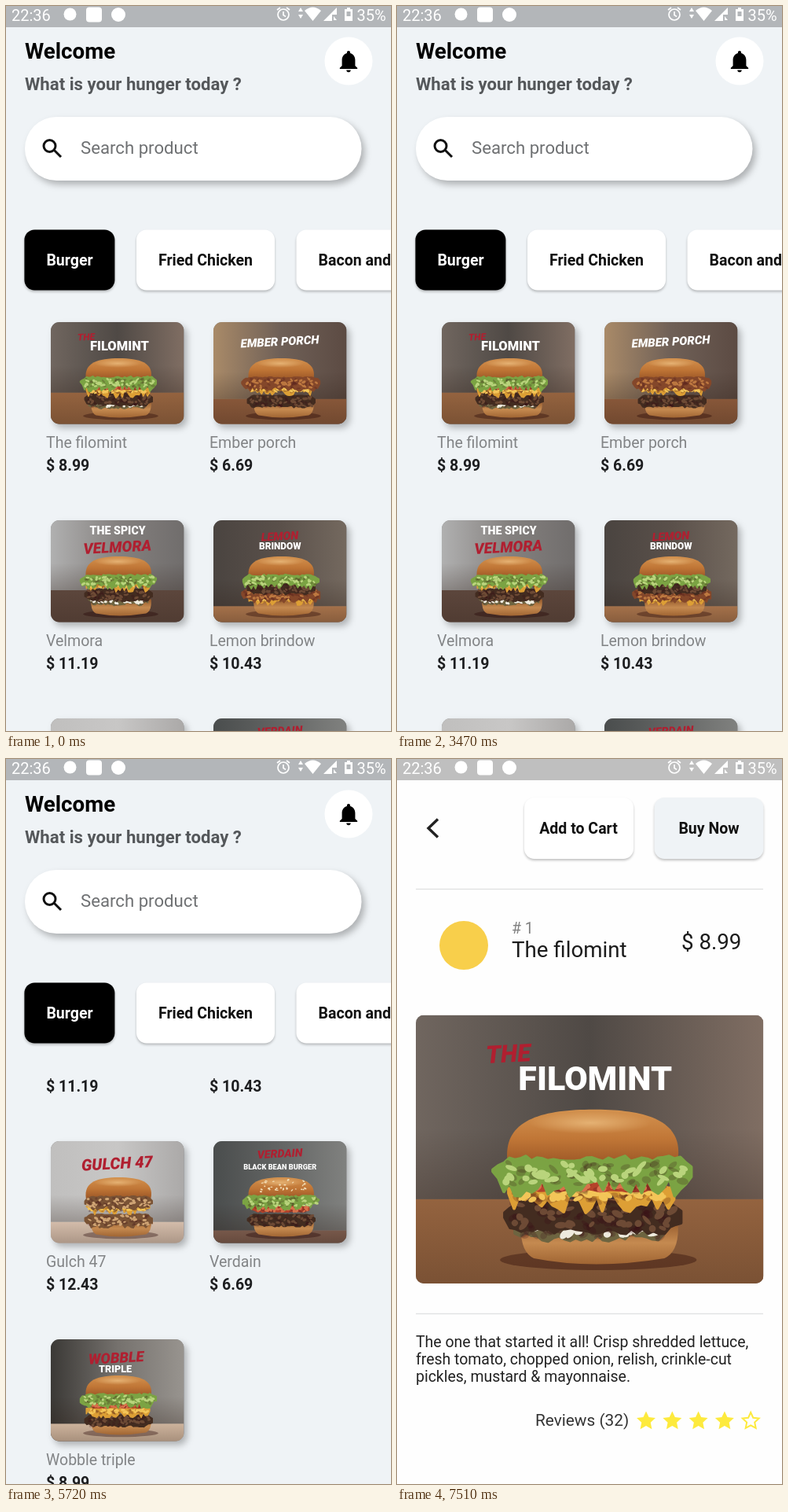
An HTML page that plays this animation: 490x922 px, repeating every 8 s.

```html
<!DOCTYPE html>
<html lang="en">
<head>
<meta charset="utf-8">
<title>Burger menu</title>
<style>
html, body { margin: 0; width: 100%; height: 100%; overflow: hidden; background: #eff3f6; }
svg#stage { display: block; width: 490px; height: 922px; font-family: Roboto, sans-serif; }
.lift { filter: drop-shadow(4px 5px 4px rgba(0,0,0,.27)); }
.low { filter: drop-shadow(0 2px 1.5px rgba(0,0,0,.24)); }
</style>
</head>
<body>
<svg id="stage" viewBox="0 0 490 922"></svg>
<script>
const stage = document.getElementById('stage');
const RED = '#b01f30', WHITE = '#fff', BG = '#eff3f6';

// edge is the top of the table; layers run from top to bottom;
// lines are [text, colour, x, baseline, size, style]
const items = [
  { name: 'The filomint', price: '8.99', bg: ['#70665f', '#4f4945', '#806e63'], table: '#94633f', edge: 234, layers: 'LTCPO',
    lines: [['THE', RED, 118, 60, 31, 's'], ['FILOMINT', WHITE, 228, 95, 43]] },
  { name: 'Ember porch', price: '6.69', bg: ['#a98a68', '#6f6057', '#5c4b43'], table: '#875739', edge: 255, layers: 'BCP',
    lines: [['EMBER PORCH', WHITE, 221, 78, 39, 's']] },
  { name: 'Velmora', price: '11.19', bg: ['#b0b0b0', '#85817f', '#706d6c'], table: '#5c463c', edge: 232, layers: 'LCPO',
    lines: [['THE SPICY', WHITE, 222, 46, 37], ['VELMORA', RED, 222, 106, 50, 's']] },
  { name: 'Lemon brindow', price: '10.43', bg: ['#4a4440', '#5a504a', '#74695f'], table: '#a4714a', edge: 285, layers: 'LPBC',
    lines: [['LEMON', RED, 221, 66, 38, 's'], ['BRINDOW', WHITE, 221, 97, 31]] },
  { name: 'Gulch 47', price: '12.43', bg: ['#c0bfbe', '#c8c7c6', '#aba9a8'], table: '#d3bcaa', edge: 268, layers: 'FCF',
    lines: [['GULCH 47', RED, 221, 92, 53, 's']] },
  { name: 'Verdain', price: '6.69', bg: ['#4a4d4d', '#636564', '#80817f'], table: '#77584a', edge: 296, layers: 'LTP', seeds: true,
    lines: [['VERDAIN', RED, 221, 54, 37, 's'], ['BLACK BEAN BURGER', WHITE, 221, 93, 24]] },
  { name: 'Wobble triple', price: '8.99', bg: ['#3b3936', '#75716d', '#98948f'], table: '#cdb39c', edge: 280, layers: 'LTCP',
    lines: [['WOBBLE', RED, 218, 78, 48, 's'], ['TRIPLE', WHITE, 214, 110, 33]] }
];

// height, roughness, overhang, colour, fleck colour
const kinds = {
  L: [28, 20, 18, '#7ba343', '#b9d47c'],
  T: [18, 3, -12, '#b5432a', '#d8714a'],
  C: [14, 20, -2, '#dd9f35', '#f3c558'],
  P: [34, 7, 3, '#432c20', '#6d4a35'],
  O: [24, 9, -10, '#6d6440', '#eeeadd'],
  B: [32, 14, 22, '#84472a', '#bd7840'],
  F: [34, 12, 3, '#7a5335', '#cfa474']
};

let seed = 1;
const rnd = (a = 0, b = 1) => a + (b - a) * ((seed = seed * 16807 % 2147483647) / 2147483647);

const rect = (x, y, w, h, r, fill, more = '') =>
  `<rect x="${x}" y="${y}" width="${w}" height="${h}" rx="${r}" fill="${fill}" ${more}/>`;
const disc = (x, y, r, fill, more = '') => `<circle cx="${x}" cy="${y}" r="${r}" fill="${fill}" ${more}/>`;
const path = (d, fill, more = '') => `<path d="${d}" fill="${fill}" ${more}/>`;
const line = (d, color, w) => path(d, 'none', `stroke="${color}" stroke-width="${w}"`);
const text = (s, x, y, size, fill, more = '') =>
  `<text x="${x}" y="${y}" font-size="${size}" fill="${fill}" ${more}>${s}</text>`;
const bold = (s, x, y, size, fill, more = '') => text(s, x, y, size, fill, 'font-weight="700" ' + more);
const MID = 'text-anchor="middle"';

function gradient(id, colors, dir) {
  const stops = colors.map((c, i) => `<stop offset="${i / (colors.length - 1)}" stop-color="${c}"/>`).join('');
  return `<linearGradient id="${id}" ${dir}>${stops}</linearGradient>`;
}

function flecks(n, x0, x1, y0, y1, r, fill) {
  let out = '';
  while (n--) {
    const x = rnd(x0, x1), y = rnd(y0, y1);
    out += `<ellipse cx="${x}" cy="${y}" rx="${rnd(.5, 1) * r}" ry="${rnd(.3, .6) * r}" fill="${fill}" transform="rotate(${rnd(-50, 50)} ${x} ${y})"/>`;
  }
  return out;
}

function layer(kind, y) {
  const [h, rough, over, color, fleck] = kinds[kind];
  const x0 = 116 - over, x1 = 334 + over, top = [], low = [];
  for (let x = x0; x <= x1; x += 7) {
    const edge = Math.min(1, (x - x0 + 6) / 24, (x1 - x + 6) / 24);
    top.push(`${x} ${y + (1 - edge) * h / 2 - rnd(0, rough / 3)}`);
    low.unshift(`${x} ${y + h / 2 + edge * h / 2 + rnd(-.4, .8) * rough}`);
  }
  return path(`M${top.concat(low).join('L')}Z`, color, `stroke="${color}" stroke-width="4" stroke-linejoin="round"`) +
    flecks(45, x0 + 10, x1 - 10, y + 2, y + h + 2, 8, '#3013') +
    flecks(40, x0 + 10, x1 - 10, y + 2, y + h, 8, fleck);
}

function lettering([s, fill, x, y, size, style]) {
  const slant = style ? `font-style="italic" transform="rotate(-3 ${x} ${y})"` : '';
  return text(s, x, y, size, fill, `${MID} font-weight="900" ${slant}`);
}

function picture(it, i) {
  seed = 77 + i * 31;
  const gap = 88 / it.layers.length;
  const stack = [...it.layers].map((k, n) => layer(k, 186 + n * gap)).reverse().join('');
  return `<symbol id="pic${i}" viewBox="0 0 442 341" preserveAspectRatio="xMidYMid slice">` +
    gradient('wall' + i, it.bg, '') +
    rect(0, 0, 442, 341, 0, `url(#wall${i})`) +
    rect(0, it.edge - 90, 442, 90, 0, 'url(#shade)', 'opacity=".5"') +
    rect(0, it.edge, 442, 341 - it.edge, 0, it.table) +
    rect(0, it.edge, 442, 341 - it.edge, 0, 'url(#shade)', 'opacity=".45"') +
    `<ellipse cx="232" cy="311" rx="125" ry="13" fill="#200" opacity=".35"/>` +
    path('M134 262H333Q336 300 316 309Q226 324 150 309Q131 300 134 262', 'url(#base)') +
    path('M117 190C108 134 158 120 226 120C294 120 344 134 332 190Q226 200 117 190', 'url(#bun)') +
    '<ellipse cx="222" cy="137" rx="78" ry="14" fill="url(#shine)"/>' +
    (it.seeds ? flecks(30, 150, 305, 128, 168, 5, '#f3dfb8') : '') +
    stack + it.lines.map(lettering).join('') + '</symbol>';
}

function card(it, i) {
  const x = i % 2 ? 264 : 57, y = 402 + 252 * (i >> 1), tx = i % 2 ? 259 : 51;
  return `<g transform="translate(${x} ${y})">${rect(0, 0, 169.5, 129.5, 11, '#888', 'class="lift"')}` +
    `<g clip-path="url(#cardClip)"><use href="#pic${i}" width="169.5" height="130.8"/></g></g>` +
    text(it.name, tx, y + 160, 19.5, '#828486') + bold('$ ' + it.price, tx, y + 189, 19.5, '#1d1e20');
}

const chip = (s, x, w, fill, ink) =>
  rect(x, 284.5, w, 77, 13, fill, 'class="low"') + bold(s, x + 28, 330, 19.55, ink);

function star(x, full) {
  let d = '';
  for (let k = 0; k < 10; k++) {
    const r = (full ? 12.6 : 11) * (k % 2 ? .48 : 1), a = k * Math.PI / 5;
    d += `${k ? 'L' : 'M'}${x + r * Math.sin(a)} ${842 - r * Math.cos(a)}`;
  }
  return path(d + 'Z', full ? '#fdea3d' : 'none', full ? '' : 'stroke="#fdea3d" stroke-width="2"');
}

const statusBar = rect(0, 0, 490, 27, 0, '#000', 'opacity=".25"') +
  text('22:36', 7, 18.5, 20, WHITE) + disc(81.5, 10.5, 8, WHITE) + rect(102, 1.5, 20, 19, 4, WHITE) + disc(143, 11, 9, WHITE) +
  line('M346 11a7 7 0 1 0 14 0a7 7 0 1 0 -14 0M353 7v4.5l3 2M345 5l4-3M361 5l-4-3', WHITE, 1.7) +
  path('M375 2l3 5h-6zM375 16l3-5h-6z', WHITE) +
  path('M380 6Q390.5 -3 401 6L390.5 19z', WHITE) +
  path('M404 19L421 2V11H415V19zM417 13l4 5h-4z', WHITE) +
  path('M431 4h3V2h4v2h3v15h-10z', WHITE) + rect(433.5, 7, 5, 6, 0, '#b3b6b9') +
  text('35%', 446.5, 18.5, 20, WHITE);

const header = bold('Welcome', 24, 67, 27.7, '#000') +
  bold('What is your hunger today ?', 24, 107, 22.15, '#54575a') +
  disc(436, 70, 30.5, WHITE) +
  path('M12 22c1.1 0 2-.9 2-2h-4c0 1.1.89 2 2 2zm6-6v-5c0-3.07-1.64-5.64-4.5-6.32V4c0-.83-.67-1.5-1.5-1.5s-1.5.67-1.5 1.5v.68C7.63 5.36 6 7.92 6 11v5l-2 2v1h16v-1l-2-2z',
    '#000', 'transform="translate(419.2 53.5) scale(1.4)"') +
  rect(24, 141, 428.5, 81, 40.5, WHITE, 'class="lift"') +
  line('M48 178a7.5 7.5 0 1 0 15 0a7.5 7.5 0 1 0 -15 0M61 183l9 9', '#111', 3) +
  text('Search product', 95, 187.5, 22.2, '#6f7173');

const GLOW = 'M24 396H466V409Q245 429 24 409Z';

const detail = rect(0, 0, 490, 922, 0, '#fefefe') +
  line('M52 76.5L40 88L52 99.5', '#222', 3.4) +
  rect(162, 49, 139, 78, 13, WHITE, 'class="low"') + bold('Add to Cart', 231, 95, 19.5, '#111', MID) +
  rect(327.5, 49, 139, 78, 13, BG, 'class="low"') + bold('Buy Now', 397, 95, 19.5, '#111', MID) +
  line('M24 165.5H466M24 705.5H466', '#e1e2e3', 1.4) +
  disc(85, 237, 31, '#f8cf4b') +
  text('# 1', 146, 222, 19.5, '#808080') +
  text(items[0].name, 146, 252, 27.7, '#1c1c1c') + text('$ ' + items[0].price, 362, 241.5, 27.7, '#1c1c1c') +
  `<g transform="translate(24 325.5)" clip-path="url(#heroClip)"><use href="#pic0" width="442.5" height="341.5"/></g>` +
  ['The one that started it all! Crisp shredded lettuce,', 'fresh tomato, chopped onion, relish, crinkle-cut', 'pickles, mustard &amp; mayonnaise.']
    .map((s, i) => text(s, 24, 748 + 22.2 * i, 19.45, '#222')).join('') +
  text('Reviews (32)', 176, 848, 20.8, '#333') +
  [0, 1, 2, 3, 4].map(i => star(317 + 33.3 * i, i < 4)).join('');

stage.innerHTML = '<defs>' +
  gradient('bun', ['#d3924f', '#c07636', '#965224'], 'x2="0" y2="1"') +
  gradient('base', ['#94592c', '#c58a50', '#a06533'], 'x2="0" y2="1"') +
  gradient('shade', ['#2a1a1200', '#2a1a1288'], 'x2="0" y2="1"') +
  '<radialGradient id="shine"><stop stop-color="#f0c487" stop-opacity=".7"/><stop offset="1" stop-color="#f0c487" stop-opacity="0"/></radialGradient>' +
  `<clipPath id="cardClip">${rect(0, 0, 169.5, 129.5, 11, '#000')}</clipPath>` +
  `<clipPath id="heroClip">${rect(0, 0, 442.5, 341.5, 10, '#000')}</clipPath>` +
  `<clipPath id="listClip">${rect(0, 395.5, 490, 527, 0, '#000')}</clipPath>` +
  items.map(picture).join('') + '</defs>' +
  rect(0, 0, 490, 922, 0, BG) + header +
  `<g id="chips">${chip('Burger', 23.4, 115, '#000', WHITE)}${chip('Fried Chicken', 166, 176, WHITE, '#111')}${chip('Bacon and eggs', 369.5, 191, WHITE, '#111')}</g>` +
  `<g clip-path="url(#listClip)"><g id="list">${items.map(card).join('')}</g>` +
  path(GLOW, '#000', 'id="glowTop"') + path(GLOW, '#000', 'id="glowLow"') + '</g>' +
  `<g id="detail">${detail}</g>` + statusBar;

const [chips, list, glowTop, glowLow, page] =
  ['chips', 'list', 'glowTop', 'glowLow', 'detail'].map(id => document.getElementById(id));

// progress 0..1 in n held steps, the first taken at t0 and the last at t1
function steps(t, t0, t1, n) {
  if (t < t0) return 0;
  const gap = (t1 - t0) / (n - 1) || 1;
  return Math.min(1, (Math.floor((t - t0) / gap + .1) + 1) / n);
}

function glow(el, size, flip) {
  el.setAttribute('opacity', .1 * size);
  el.setAttribute('transform', flip ? `translate(0 ${922 + 396 * size}) scale(1 ${-size})` : `translate(0 ${396 - 396 * size}) scale(1 ${size})`);
}

function draw(t) {
  const x = 98 * (1 - (1 - steps(t, 1450, 2150, 10)) ** 4.8 - steps(t, 3160, 3400, 4));
  const y = 430 * steps(t, 4480, 4870, 6) ** 1.38 - 30 * steps(t, 5720, 5880, 3) -
    8 * steps(t, 6030, 6030, 1) - 392 * steps(t, 6200, 6270, 2);
  chips.setAttribute('transform', `translate(${-x} 0)`);
  list.setAttribute('transform', `translate(0 ${-y})`);
  glow(glowLow, t < 4870 ? 0 : 1 - steps(t, 4950, 5340, 6), true);
  glow(glowTop, t < 6270 ? 0 : 1 - steps(t, 6350, 6660, 5), false);
  page.setAttribute('opacity', t < 7120 ? 0 : t < 7420 ? .2 : t < 7510 ? .65 : 1);
}

const start = performance.now();
function tick() {
  draw((performance.now() - start) % 8000);
  requestAnimationFrame(tick);
}
tick();
</script>
</body>
</html>
```
